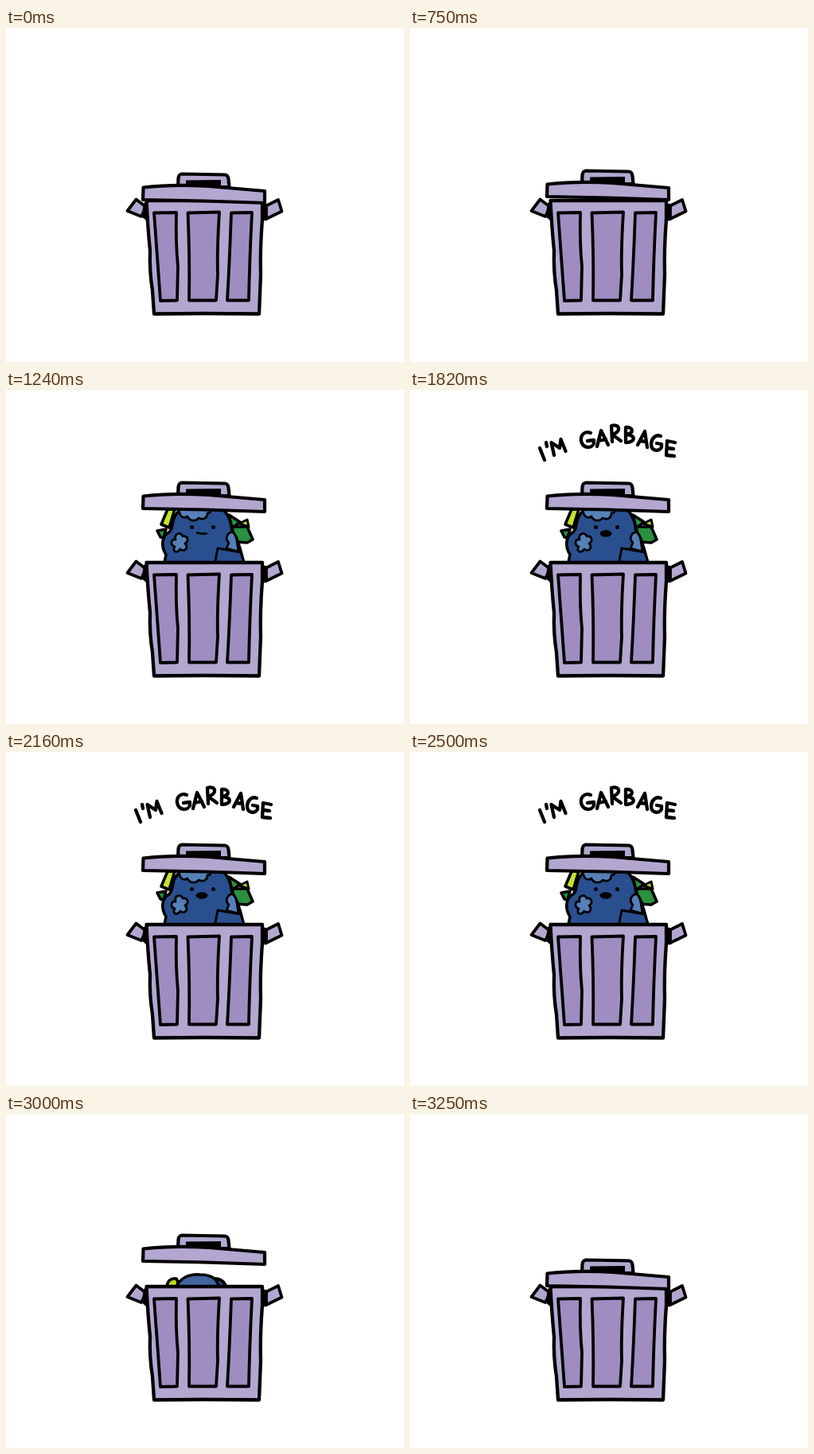
An HTML page that plays this animation: 500x420 px, repeating every 3420 ms.

```html
<!DOCTYPE html>
<html lang="en">
<head>
<meta charset="utf-8">
<title>Garbage can</title>
<style>
html, body { margin: 0; width: 100%; height: 100%; overflow: hidden; background: #fff; }
svg { display: block; width: 500px; height: 420px; }
path { stroke-linejoin: round; stroke-linecap: round; }
.ink { stroke: #000; }
</style>
</head>
<body>
<svg viewBox="0 0 500 420" fill="none">
  <g id="words" role="img" aria-label="I'm garbage" class="ink" stroke-width="4.3"></g>

  <g id="full" class="ink" stroke-width="3.6">
    <path fill="#c3e32a" d="M203 150 L212 150 L205 173 L195 169 Z"/>
    <path fill="#2a9140" d="M190 177 L201 175 L198 186 L194 185 Z"/>
    <path fill="#2a9140" d="M280 157 L294 166 L284 174 Z"/>
    <path fill="#b5e02a" stroke-width="3" d="M293 168 L303 163 L305 172 Z"/>
    <path fill="#2a9140" d="M284 172 L303 172 L310 188 L303 192 L288 191 Z"/>
    <path fill="#2a4f8f" d="M198 222 L201 207 C195 198 195 186 203 180 C211 177 207 164 214 156 C220 144 263 142 272 150 C281 157 283 168 284 178 C291 184 291 192 294 199 L300 222 Z"/>
    <g fill="#5580b8" stroke-width="2.8">
      <path d="M218 148 C216 157 222 163 228 159 C231 166 239 165 242 161 C248 164 253 161 253 155 C257 155 258 152 257 148 Z"/>
      <path d="M213 188 C211 180 220 178 222 184 C229 183 230 190 225 193 C230 199 224 204 219 200 C215 206 208 203 212 197 C206 195 207 187 213 188 Z"/>
      <path d="M277 199 L280 192 C274 187 279 178 285 179 C290 182 290 190 291 196 L292 203 Z"/>
    </g>
    <path fill="#2a4f8f" stroke-width="3" d="M266 199 L295 204 L300 220 L262 220 Z"/>
    <g fill="#000" stroke="none">
      <circle cx="233.5" cy="172.5" r="2.5"/>
      <circle cx="260.5" cy="172.5" r="2.5"/>
      <ellipse id="open" cx="246" cy="180.500" rx="7.5" ry="4.2"/>
    </g>
    <path id="shut" stroke-width="2.6" d="M240 179.500 Q246 181.500 252 180.500"/>
  </g>

  <g id="peek" class="ink" stroke-width="3.6">
    <path fill="#b9dc20" d="M202 219 C202 210 207 206 214 207 L219 219 Z"/>
    <path fill="#2a4f8f" d="M258 207 C268 206 275 210 277 219 L256 219 Z"/>
    <path fill="#41659f" d="M213 219 C218 206 230 201 244 202 C257 202 266 207 268 219 Z"/>
  </g>

  <g class="ink" stroke-width="3.8">
    <path fill="#b3a7d0" d="M163.500 215.500 L176 225 L170 237 L152.500 230 Z"/>
    <path fill="#000" d="M175 221 L178 222 L178 241 L172 236 Z"/>
    <path fill="#b3a7d0" d="M342 216 L346.500 230.500 L326 240.500 L326 224 Z"/>
    <path fill="#000" d="M322 222 L327 223 L327 237 L322 242 Z"/>
    <path fill="#b3a7d0" stroke-width="4.3" d="M176.500 217 L322 217 L322 240 Q319 280 320 310 L318 359.500 L250 359 L186 359.500 L184 330 Q180 305 181 280 Q178 250 176.500 217 Z"/>
    <g fill="#9f8dc1">
      <path d="M186 232.500 L214 232 Q213 270 216 300 L215 342.500 L194 343 Q190 290 186 232.500 Z"/>
      <path d="M228.500 232.500 L268 231.500 Q265 280 266 310 L264 342.500 L230 342.500 Q231 290 228.500 232.500 Z"/>
      <path d="M283 232.500 L309 232 Q306 290 305 342.500 L278 342.500 Q281 290 283 232.500 Z"/>
    </g>
  </g>

  <g id="lid" class="ink" fill="#b3a7d0" stroke-width="4.2">
    <path d="M216 200 L216.500 189 Q217 184 221 183.500 L248 184 L275 184.500 Q279 185 279.500 190 L280.500 200 Z"/>
    <path fill="#000" stroke="none" d="M226 191.500 L270 191 L270 200 L226 200 Z"/>
    <path d="M172.500 200.500 Q210 196 255 199 L325 205 L325 220 Q250 217 172 216 Z"/>
  </g>
</svg>
<script>
const LOOP = 3420;
const REST = -67;

// start ms, lid offset, trash ("" hidden, "peek", "full"), trash offset, talk (0 silent, 1 open, 2 closed)
const STEPS = [
  [0, 0, "", 0, 0],
  [750, -4, "", 0, 0],
  [830, -34, "peek", 0, 0],
  [910, -71, "full", 0, 0],
  [990, -76, "full", 0, 0],
  [1070, -64, "full", 0, 0],
  [1240, REST, "full", 0, 0],
  [1820, REST, "full", 0, 1],
  [1990, REST, "full", 0, 2],
  [2160, REST, "full", 0, 1],
  [2330, REST, "full", 0, 2],
  [2500, REST, "full", 0, 1],
  [2670, REST, "full", 0, 2],
  [2840, -71, "full", 0, 0],
  [2920, -60, "full", 12, 0],
  [3000, -31, "peek", 0, 0],
  [3080, 4, "", 0, 0],
  [3250, 0, "", 0, 0]
];

// hand lettering: centre x, centre y, strokes
const LETTERS = [
  [166, 81, "M163 73 L169 88"],
  [172, 69, "M171 66 L172 71"],
  [188, 71, "M181 82 L177.500 66 L188 73 L189.500 62 L195.500 77"],
  [223, 62, "M227 54 C219 51 214 57 215 64 C217 74 229 74 231 67 L231 63 L223 64"],
  [241, 60, "M235 71 L240 51 L249 69 M237 64 L246 62"],
  [259, 55, "M254 65 L253 45 C264 42 266 53 254 56 L265 64"],
  [275, 56, "M271 66 L271 47 C281 46 282 55 271 56 C284 56 284 66 271 66"],
  [292, 61, "M286 69 L295 52 L298 72 M289 64 L297 65"],
  [310, 66, "M315 58 C308 55 303 62 303 68 C303 77 313 78 316 72 L316 68 L310 67"],
  [327, 74, "M333 66 L323 64 L322 82 L332 83 M323 73 L331 74"]
];

const $ = id => document.getElementById(id);
const show = (el, on) => el.setAttribute("visibility", on ? "inherit" : "hidden");
const shift = (el, y) => el.setAttribute("transform", `translate(0 ${y})`);

const parts = Object.fromEntries(
  ["words", "full", "peek", "open", "shut", "lid"].map(id => [id, $(id)])
);

const glyphs = LETTERS.map(([x, y, d]) => {
  const el = document.createElementNS("http://www.w3.org/2000/svg", "path");
  el.setAttribute("d", d);
  parts.words.append(el);
  return { el, x, y };
});

function wobble(on) {
  glyphs.forEach(({ el, x, y }, i) => {
    const turn = on ? (i % 2 ? 3 : -3) : 0;
    el.setAttribute("transform", `rotate(${turn} ${x} ${y})`);
  });
}

let last;
function draw(now) {
  const t = now % LOOP;
  const step = STEPS.findLast(s => s[0] <= t);
  if (step !== last) {
    const [, lidY, trash, trashY, talk] = last = step;
    shift(parts.lid, lidY);
    shift(parts.full, trashY);
    show(parts.full, trash === "full");
    show(parts.peek, trash === "peek");
    show(parts.words, talk > 0);
    show(parts.open, talk === 1);
    show(parts.shut, talk !== 1);
    wobble(talk === 2);
  }
}

const start = performance.now();
function tick() {
  draw(performance.now() - start);
  requestAnimationFrame(tick);
}
tick();
</script>
</body>
</html>
```
